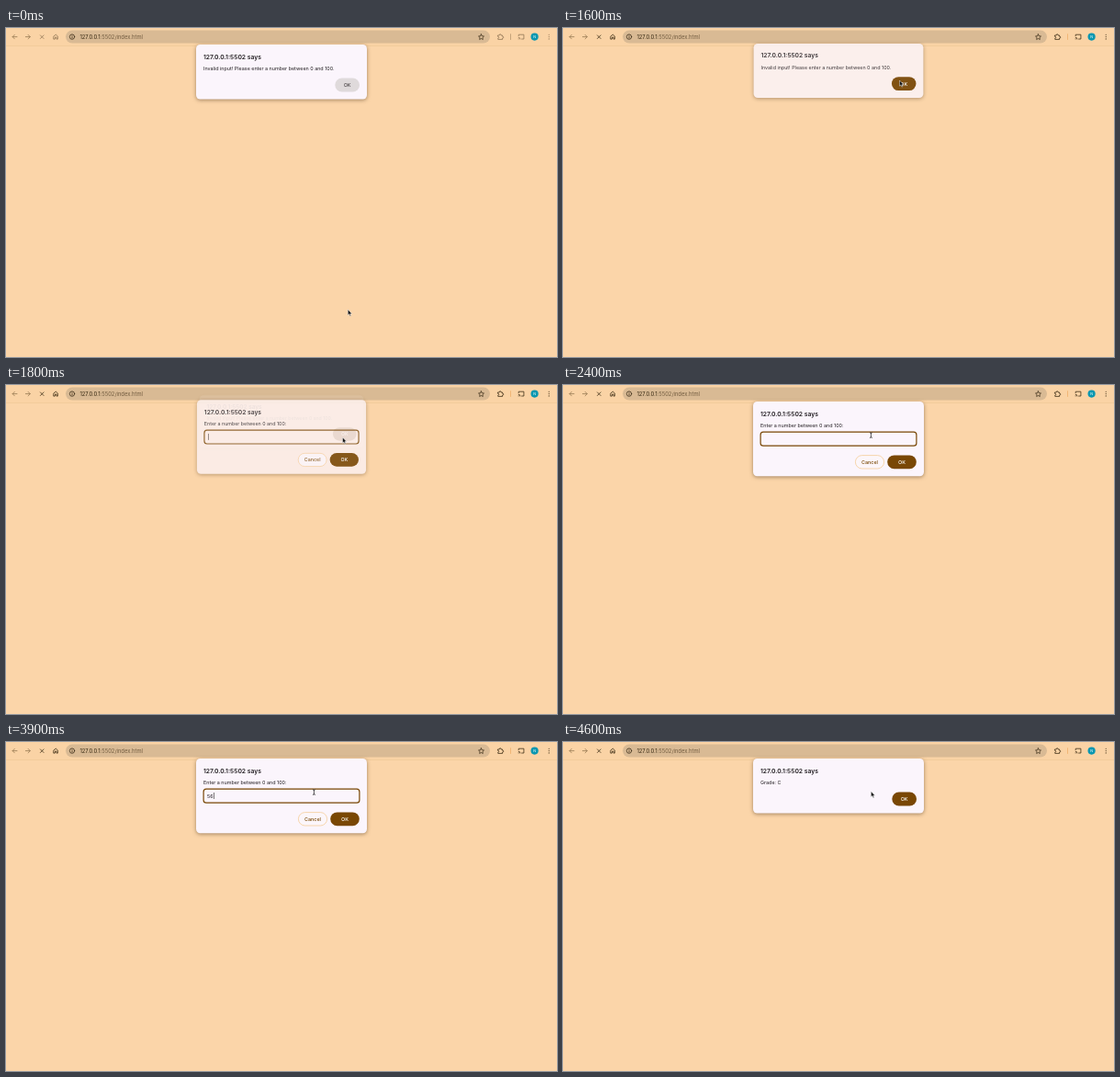
An HTML page for the animation above (5 s loop, 600 by 358 pixels).

```html
<!DOCTYPE html>
<html lang="en">
<head>
<meta charset="utf-8">
<title>Grade prompt</title>
<style>
  html, body { margin: 0; width: 100%; height: 100%; overflow: hidden; background: #fbd5a9; }
  svg { display: block; width: 100vw; height: 100vh; }
  text { font-family: Inter, "Open Sans", sans-serif; font-size: 5.4px; fill: #211d20; white-space: pre; }
  .url { font-size: 5.83px; fill: #33260f; }
  .url .dim { fill: #715b3f; }
  .title { font-size: 6.75px; font-weight: 600; }
  .label { font-weight: 500; text-anchor: middle; }
  .card { fill: #fbf5fc; filter: drop-shadow(0 1px 2px rgba(70, 45, 15, .5)); }
  .line { fill: none; stroke-width: .75; stroke-linecap: round; stroke-linejoin: round; }
</style>
</head>
<body>
<svg viewBox="0 0 600 358" id="stage"></svg>
<script>
const LOOP = 5000, STEP = 100;
const BROWN = '#794704';

const button = (x, y, w, h, label, fill, ink, stroke = 'none') => `
  <rect class="pill" x="${x}" y="${y}" width="${w}" height="${h}" rx="${h / 2}" fill="${fill}" stroke="${stroke}" stroke-width=".7"/>
  <text class="label" x="${x + w / 2}" y="${y + h / 2 + 1.95}" style="fill:${ink}">${label}</text>`;

const dialog = (id, height, message, extra, ok) => `
  <g id="${id}">
    <rect class="card" x="207" y="18" width="186" height="${height}" rx="4.5"/>
    <g class="copy">
      <text class="title" x="215" y="33.7">127.0.0.1:5502 says</text>
      <text x="215" y="45.9">${message}</text>
      ${extra}
    </g>
    <g class="ok">${ok}</g>
  </g>`;

const alertOk = button(358.3, 54.5, 26.7, 15, 'OK', BROWN, '#fff');

const promptBody = `
  <rect id="ring" x="215.1" y="51.2" width="169.8" height="15" rx="3" fill="none" stroke="${BROWN}" stroke-width="1.2"/>
  <text id="typed" x="219" y="60.5"></text>
  <rect id="caret" x="219.4" y="55" width=".6" height="7" fill="#2b2522"/>
  ${button(318.4, 76.6, 31.2, 14.4, 'Cancel', '#fcf6fa', BROWN, '#f4c78c')}`;

const toolbar = `
  <rect width="600" height="19.5" fill="#fad3a5"/>
  <rect y="19.2" width="600" height=".7" fill="#f0c997"/>
  <rect x="65" y="2.6" width="462" height="13.9" rx="6.95" fill="#d9ba94"/>
  <g class="line" stroke="#92754e">
    <path d="M12 9.6H7.2M9.3 7.4L7.1 9.6L9.3 11.8"/>
    <path d="M21.4 9.6H26.2M24.1 7.4L26.3 9.6L24.1 11.8"/>
  </g>
  <g class="line" id="icons">
    <path d="M37.4 7.9L41 11.5M41 7.9L37.4 11.5"/>
    <path d="M52.1 8.9L54.2 7.1L56.3 8.9V12.1H55V10.1H53.4V12.1H52.1Z"/>
    <path d="M535.8 8H537.2C536.9 6.2 539.4 6.2 539.1 8H540.6V9.2C542.3 9 542.3 11.2 540.6 11V12.4H535.8V11C537.2 11 537.2 9.2 535.8 9.2Z"/>
    <path d="M558.2 8.6V7.2H563.9V12H561.6M558.2 10.2Q560 10.2 560 12M558.2 11.8V12"/>
    <path d="M591.2 7.3V7.3M591.2 9.6V9.6M591.2 11.9V11.9" stroke-width="1.1"/>
  </g>
  <g class="line" stroke="#3b2c17">
    <circle cx="72" cy="9.6" r="2.7"/>
    <path d="M72 9.5V10.9M72 8.2V8.2"/>
    <path d="M517.5 6.8L518.4 8.7L520.5 9L519 10.4L519.3 12.5L517.5 11.5L515.7 12.5L516 10.4L514.5 9L516.6 8.7Z"/>
  </g>
  <rect id="split" x="549.2" y="6.3" width=".8" height="6.6"/>
  <circle cx="575.6" cy="9.6" r="4.1" fill="#0b97b0"/>
  <text class="label" x="575.6" y="11" style="font-size:3.8px;fill:#d8f3f6">N</text>
  <text class="url" x="80.4" y="11.7">127.0.0.1<tspan class="dim">:5502/index.html</tspan></text>`;

const stage = document.getElementById('stage');
stage.innerHTML = `
  <rect width="600" height="358" fill="#fbd5a9"/>
  ${toolbar}
  ${dialog('invalid', 59.5, 'Invalid input! Please enter a number between 0 and 100.', '', alertOk)}
  ${dialog('ask', 81.3, 'Enter a number between 0 and 100:', promptBody,
    button(353.2, 76.4, 31.6, 14.8, 'OK', BROWN, '#fff'))}
  ${dialog('grade', 59.5, 'Grade: C', '', alertOk)}
  <path id="arrow" d="M0 0V6.1L1.4 4.9L2.4 7.1L3.4 6.7L2.4 4.6H4.3Z" fill="#111" stroke="#fff" stroke-width=".45"/>
  <path id="beam" class="line" d="M-1 -2.8Q0 -2.8 0 -2Q0 -2.8 1 -2.8M0 -2V2M-1 2.8Q0 2.8 0 2Q0 2.8 1 2.8" stroke="#222"/>`;

const el = id => document.getElementById(id);
const show = (node, on) => node.setAttribute('visibility', on ? 'visible' : 'hidden');

// Linear interpolation through [time, value] keys
function track(keys, t, col = 1) {
  if (t <= keys[0][0]) return keys[0][col];
  for (let i = 1; i < keys.length; i++) {
    const a = keys[i - 1], b = keys[i];
    if (t <= b[0]) return a[col] + (b[col] - a[col]) * (t - a[0]) / (b[0] - a[0]);
  }
  return keys[keys.length - 1][col];
}

const presence = {
  invalid: [[1500, 1], [1600, .87], [1700, .55], [1800, .2], [1900, 0]],
  ask: [[1600, 0], [1700, .4], [1800, .8], [1900, 1], [4300, 1], [4400, .45], [4500, .1], [4600, 0]],
  grade: [[4300, 0], [4400, .55], [4500, .9], [4600, 1]]
};

const pointer = [
  [200, 372.3, 306.3], [400, 371, 298], [600, 366, 255], [800, 356, 176],
  [900, 348, 112], [1000, 341.9, 65.4], [1200, 354, 59], [1400, 366.5, 57],
  [1800, 366.5, 57], [1900, 361, 59], [2000, 353, 60], [2100, 346, 60],
  [2300, 337, 56], [2400, 335.4, 54.6], [4300, 335.4, 54.6], [4400, 335.4, 53.7]
];

// Dialogs drop in from above while growing and fading
function pose(id, t) {
  const k = track(presence[id], t), g = el(id), s = 1 - .05 * (1 - k);
  show(g, k > 0);
  g.setAttribute('transform', `translate(300 ${18 - 8.5 * (1 - k)}) scale(${s}) translate(-300 -18)`);
  g.querySelector('.card').style.opacity = k ** 1.5;
  g.querySelector('.copy').style.opacity = k;
  g.querySelector('.ok').style.opacity = k ** .5;
}

function draw(time) {
  const t = Math.floor(time % LOOP / STEP) * STEP;
  const focused = t >= 1500;

  Object.keys(presence).forEach(id => pose(id, t));

  el('icons').setAttribute('stroke', focused ? '#35260f' : '#8b7050');
  el('split').setAttribute('fill', focused ? '#efb06b' : '#b99870');
  const ok = el('invalid').querySelector('.ok');
  ok.querySelector('rect').setAttribute('fill', focused ? BROWN : '#dfdadb');
  ok.querySelector('text').style.fill = focused ? '#fff' : '#4e494b';

  const typed = t < 3800 ? '' : t < 3900 ? '5' : '56';
  el('typed').textContent = typed;
  el('caret').setAttribute('x', 219.4 + typed.length * 3.5);
  const caretOn = t < 2400 || (t >= 2900 && t < 3400) || t >= 3800;
  el('caret').style.opacity = caretOn ? 1 : 0;
  el('ring').style.opacity = t >= 4400 ? .35 : 1;

  const at = `translate(${track(pointer, t)} ${track(pointer, t, 2)})`;
  const beam = t >= 2100 && t < 4400;
  el('arrow').setAttribute('transform', at);
  el('beam').setAttribute('transform', at);
  show(el('arrow'), !beam);
  show(el('beam'), beam);
}

const start = performance.now();
function tick() {
  draw(performance.now() - start);
  requestAnimationFrame(tick);
}
tick();
</script>
</body>
</html>
```
